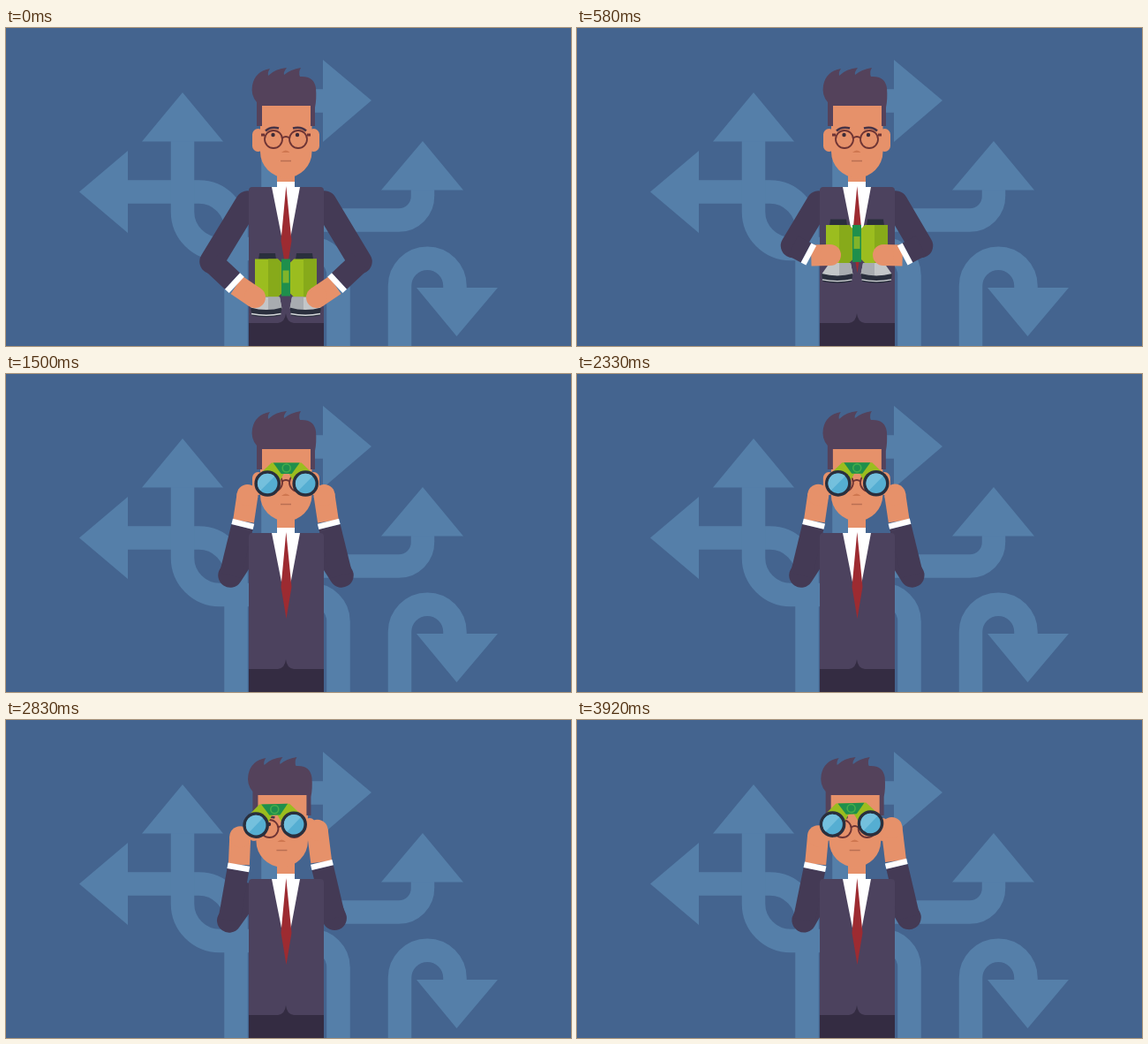
An HTML page with a canvas for the animation above (4010 ms loop, 640 px wide and 360 px high).

```html
<!DOCTYPE html>
<html lang="en">
<head>
<meta charset="utf-8">
<title>Man with binoculars</title>
<style>
html, body { margin: 0; width: 100%; height: 100%; overflow: hidden; background: #44648f; }
canvas { display: block; }
</style>
</head>
<body>
<canvas id="stage" width="640" height="360"></canvas>
<script>
const c = document.getElementById('stage').getContext('2d');
const LOOP = 4010, FPS = 12, AXIS = 317;
const SKIN = '#e6916a', HAIR = '#54425b', JACKET = '#4c425e', SLEEVE = '#443a55',
      PANTS = '#342c42', DARK = '#2a2f3d', FRAME = '#6e3434',
      LIME = '#9bbd1f', SHADE = '#87aa1a', GREEN = '#1f8f4c';

function fill(d, color) {
  c.fillStyle = color;
  c.fill(new Path2D(d));
}
function line(d, color, width, cap = 'butt') {
  c.strokeStyle = color;
  c.lineWidth = width;
  c.lineCap = cap;
  c.stroke(new Path2D(d));
}
function disc(x, y, r, color, from = 0) {
  c.fillStyle = color;
  c.beginPath();
  c.arc(x, y, r, from, from ? from + Math.PI : 7);
  c.fill();
}
function at(x, y, draw, turn = 0, sx = 1, sy = 1) {
  c.save();
  c.translate(x, y);
  c.rotate(turn);
  c.scale(sx, sy);
  draw();
  c.restore();
}

const accel = u => u ** 2.5;
const decel = u => 1 - (1 - u) ** 3;
const smooth = u => u * u * (3 - 2 * u);
const inOut = u => u < .5 ? 4 * u ** 3 : 1 - 4 * (1 - u) ** 3;

// Runs through legs of [start, end, from, to, ease], holding between them
function play(legs, t) {
  const [t0, t1, a, b, ease] = legs.findLast(leg => t >= leg[0]) || legs[0];
  const u = ease(Math.min(1, Math.max(0, (t - t0) / (t1 - t0))));
  return a.map((v, i) => v + (b[i] - v) * u);
}

// Binoculars y, head y, then elbow, wrist and fingertip, with x measured out from AXIS
const low = [291.5, 0, 84, 264.5, 60.5, 286.5, 35, 305];
const chest = [253, 0, 72.5, 246.5, 57.5, 254.5, 30, 257];
const eyes = [133, -1, 64, 230.5, 51, 181, 43.5, 145];
const look = [124, -3, 63, 228, 49.5, 173, 43.5, 137];
const raise = [
  [40, 580, low, chest, accel],
  [580, 830, chest, eyes, smooth],
  [830, 1420, eyes, look, decel]
];
// Sideways pan and lift of the gaze
const gaze = [
  [2170, 3000, [0, 0], [-13.5, -5.5], inOut],
  [3540, 3920, [-13.5, -5.5], [-6.5, -6.5], accel]
];

// Joints nearer the hand follow the gaze more
function arm(joints, side, pan, lift) {
  return [0, 1, 2].map(i => {
    const dx = side < 0 ? pan * (.5 + .27 * i) - lift : pan * .6;
    const dy = side < 0 ? lift * (.2 + .35 * i) : lift * (.7 + .4 * i * i);
    return [AXIS + side * joints[2 * i] + dx, joints[2 * i + 1] + dy];
  });
}

function background() {
  c.fillStyle = '#44648f';
  c.fillRect(0, 0, 640, 360);
  line(`M302.5 250V125A42.5 42.5 0 0 1 345 82.5H360
    M340 217.5H445A27 27 0 0 0 472 190V183
    M446 360V292A31.25 31.25 0 0 1 508.5 292V295`, '#557fa9', 26.5);
  line('M137 185.5H218A42 42 0 0 1 260.5 228V360', '#557fa9', 26.5);
  line('M200 127V208A42 42 0 0 0 242 250H346A30 30 0 0 1 376.5 280V360', '#557fa9', 26.5);
  fill(`M414 82L359 36V129Z M83 185.5L138 139V232Z M200 73L154 128.5H246Z
    M472 128L425 183.5H518Z M510.5 349L465 294H557Z`, '#557fa9');
}

function body() {
  fill('M275 322H360V360H275Z', PANTS);
  fill('M279 180H356Q360 180 360 184V334H326Q318 333 317 323Q316 333 308 334H275V184Q275 180 279 180Z', JACKET);
  fill('M307 150H327V176H307Z', SKIN);
  fill('M307 174H327V180H333L317.5 263L301 180H307Z', '#fff');
  fill('M317.3 179L323.5 241L317.5 277L311.5 241Z', '#9d2b31');
}

function eye(x) {
  line(`M${x - 10} 126a10 10 0 1 1 20 0a10 10 0 1 1 -20 0`, FRAME, 1.8);
}

function head() {
  line('M285.5 120.5V133.5M348.5 120.5V133.5', SKIN, 13, 'round');
  fill('M288 86H346.5V140A29.25 29.5 0 0 1 288 140Z', SKIN);
  fill(`M284 111V84Q277 76 279 65Q282 49 299 46Q296 50 297 54Q305 46 318 45
    Q314 50 315 53Q322 47 334 45Q331 50 333 55Q349 54 351 68Q352 80 350 90
    V111H345V88H290V111Z`, HAIR);
  line('M294 116.5Q300 111 309 113.5M325 113.5Q334 111 340 116.5', '#463447', 2.6);
  disc(302.5, 121, 2.2, '#3b2b38');
  disc(330, 121, 2.2, '#3b2b38');
  eye(303);
  eye(331);
  line('M313 124.5Q317 121.5 321 124.5', FRAME, 1.8);
  line('M289 121H293M341 121H345', FRAME, 3);
  fill('M312 141Q317 136 321.5 141Z', '#cf7750');
  line('M311 150.5H323', '#b96f52', 1.5);
}

function sleeve(x, [[ex, ey], [wx, wy]]) {
  line(`M${x} 198L${ex} ${ey}`, SLEEVE, 27.5, 'round');
  line(`M${ex} ${ey}L${wx} ${wy}`, SLEEVE, 25);
}

function hand([[ex, ey], [wx, wy], [tx, ty]]) {
  const k = 6.5 / Math.hypot(wx - ex, wy - ey);
  const cx = wx + (wx - ex) * k, cy = wy + (wy - ey) * k;
  line(`M${cx} ${cy}L${tx} ${ty}`, SKIN, 24);
  disc(tx, ty, 12, SKIN);
  line(`M${wx} ${wy}L${cx} ${cy}`, '#fff', 25);
}

function barrel(shade) {
  fill('M-31 -29L-30 -36.5H-12L-11 -29Z', DARK);
  fill('M-35 -30H-9L-4 -25V8L-9 13H-35Z', LIME);
  fill(shade, SHADE);
  fill('M-31 13H-7L-4.5 26Q-22 30 -40 26Z', '#c3c6c8');
  fill('M-20 13H-7L-4.5 26Q-12 28 -20 28Z', '#a8acb0');
  fill('M-40 25Q-22 30 -4.5 25L-6 34Q-22 37.5 -38.5 34Z', DARK);
  line('M-39 32Q-22 35.5 -5.5 32', '#d5d8da', 1.3);
}

function sideView() {
  at(0, 0, () => barrel('M-20 -30H-9L-4 -25V8L-9 13H-20Z'));
  at(0, 0, () => barrel('M-35 -30H-20V13H-35Z'), 0, -1);
  fill('M-5 -30H5V12H-5Z', GREEN);
  fill('M-3.5 -17H3.5V-3H-3.5Z', '#80b42a');
}

function lens() {
  disc(0, 0, 14.8, DARK);
  disc(0, 0, 11.3, '#55aed2');
  disc(0, 0, 11.3, '#74c0dd', Math.PI * .75);
}

function frontView() {
  fill('M-17 -23.5H17L31 -10L22 0L8 -2L3 -11H-3L-8 -2L-22 0L-31 -10Z', LIME);
  fill('M-15 -23.5H15L6 -11H-6Z', GREEN);
  line('M-4.5 -17.5a4.5 4.5 0 1 1 9 0a4.5 4.5 0 1 1 -9 0', '#45ac4a', 1.6);
  at(-21.5, 0, lens);
  at(21.5, 0, lens);
}

function draw(t) {
  const [y, nod, ...joints] = play(raise, t);
  const [pan, lift] = play(gaze, t);
  const armL = arm(joints, -1, pan, lift), armR = arm(joints, 1, pan, lift);
  const raised = y < 193;
  background();
  sleeve(273.5, armL);
  sleeve(361, armR);
  body();
  at(pan * .35, nod, head);
  // The barrels foreshorten as they tip towards the viewer
  if (!raised) at(AXIS, y, sideView, 0, 1, Math.min(1, 1 - (253 - y) / 110));
  hand(armL);
  hand(armR);
  if (raised) at(AXIS + .7 + pan, y + lift, frontView, lift * .004);
}

function tick(now) {
  const step = Math.floor((now % LOOP + 5) * FPS / 1000);
  draw(Math.min(step, 47) * 1000 / FPS);
  requestAnimationFrame(tick);
}
tick(0);
</script>
</body>
</html>
```
